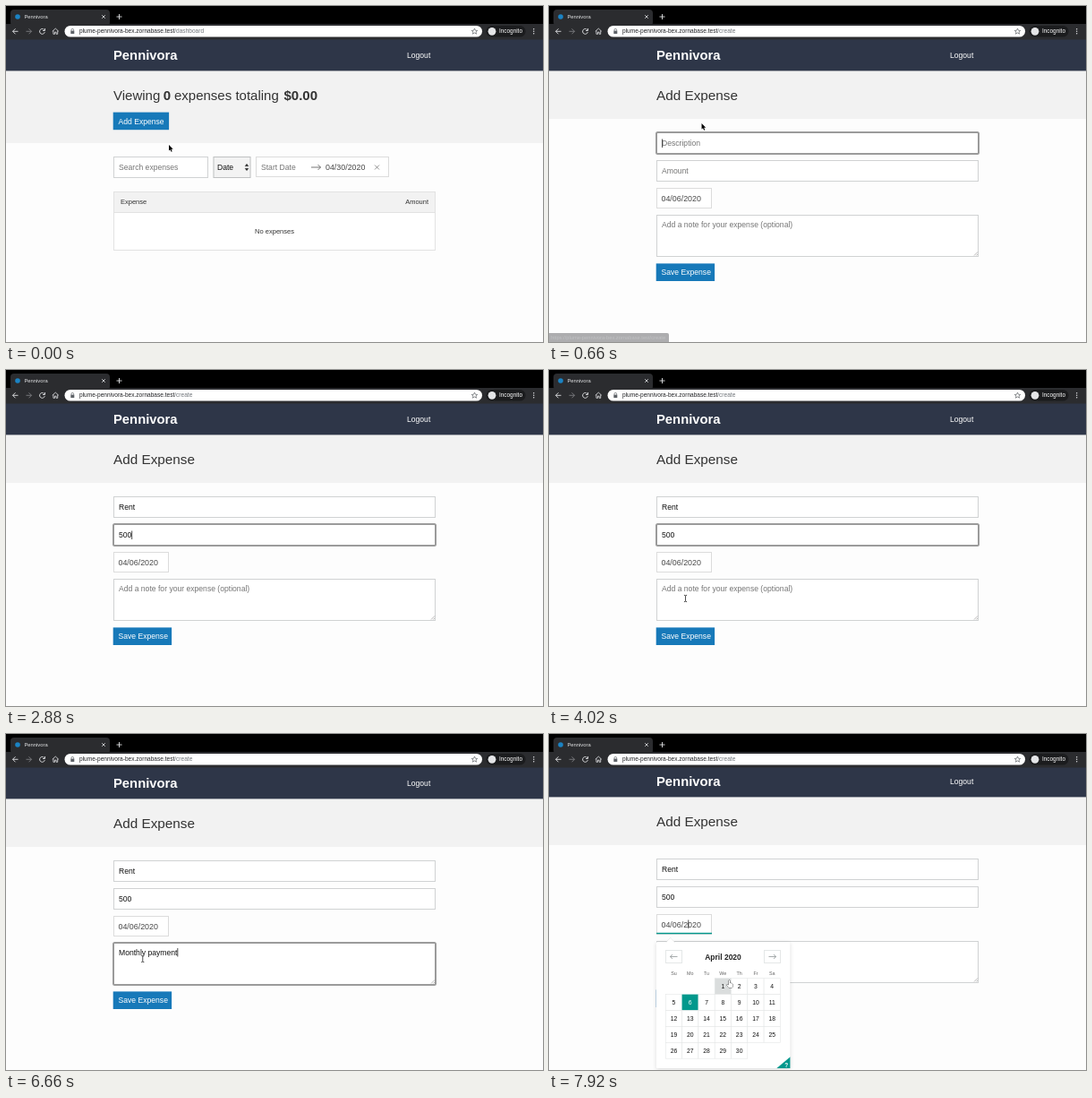
Write an HTML page with a canvas that moves like this. It is 600 px wide and 375 px high and loops after 8 s.

```html
<!DOCTYPE html>
<html lang="en">
<head>
<meta charset="utf-8">
<title>Pennivora</title>
<style>
html, body { margin: 0; width: 100%; height: 100%; overflow: hidden; background: #fdfdfd; }
canvas { display: block; width: 600px; height: 375px; }
</style>
</head>
<body>
<canvas id="stage"></canvas>
<script>
const canvas = document.getElementById('stage');
const c = canvas.getContext('2d');
const dpr = window.devicePixelRatio || 1;
canvas.width = 600 * dpr;
canvas.height = 375 * dpr;

const LOOP = 8000, STEP = 60;
const APP = 'Pennivora';
const HOST = 'plume-pennivora-bex.zornabase.test';
const INK = '#333', HINT = '#757575', LINE = '#d0d2d3', BLUE = '#1779b9', TEAL = '#02988c';

// Key times
const T = { hover: 300, open: 540, amount: 1980, note: 4080, date: 7020, scroll: 7500 };
const CURSOR = [
  [0, 182, 155], [60, 182, 155], [360, 171, 131], [720, 170.5, 131], [1020, 166, 152],
  [3360, 164, 158], [3780, 152.5, 255], [6600, 152.5, 255], [6900, 155, 216],
  [7500, 155, 216], [7860, 201.5, 275]
];

// Typed words: [first key time, delay per key, text]
const KEYS = {
  name: [[1200, 60, 'Rent']],
  amount: [[2220, 150, '500']],
  note: [[4560, 120, 'Monthly '], [5640, 120, 'payment']]
};

function typed(parts, t) {
  let text = '', last = 0;
  for (const [start, gap, word] of parts) {
    const n = Math.max(0, Math.min(word.length, Math.floor((t - start) / gap) + 1));
    text += word.slice(0, n);
    if (n) last = start + (n - 1) * gap;
  }
  return { text, last };
}

function cursorAt(t) {
  const i = CURSOR.findIndex(k => k[0] > t);
  if (i < 0) return CURSOR[CURSOR.length - 1].slice(1);
  const [t0, x0, y0] = CURSOR[i - 1], [t1, x1, y1] = CURSOR[i];
  const u = (t - t0) / (t1 - t0), e = u * u * (3 - 2 * u);
  return [x0 + (x1 - x0) * e, y0 + (y1 - y0) * e];
}

function text(s, x, y, size = 8.6, color = INK, align = 'left', weight = 400) {
  c.font = `${weight} ${size}px "Liberation Sans", Arial, sans-serif`;
  c.textAlign = align;
  c.fillStyle = color;
  c.fillText(s, x, y);
  return c.measureText(s).width;
}

function bold(s, x, y, size, color = INK, align = 'left') {
  text(s, x, y, size, color, align, 700);
}

function rect(x, y, w, h, color) {
  c.fillStyle = color;
  c.fillRect(x, y, w, h);
}

function box(x, y, w, h, fill = '#fff', line = LINE) {
  rect(x, y, w, h, fill);
  c.strokeStyle = line;
  c.lineWidth = 1;
  c.strokeRect(x + 0.5, y + 0.5, w - 1, h - 1);
}

function pill(x, y, w, h, r, color) {
  c.beginPath();
  c.roundRect(x, y, w, h, r);
  c.fillStyle = color;
  c.fill();
}

function disc(x, y, r, color) {
  c.beginPath();
  c.arc(x, y, r, 0, 7);
  c.fillStyle = color;
  c.fill();
}

function trace(d, x, y, line, width = 1, fill) {
  const p = new Path2D(d);
  c.save();
  c.translate(x, y);
  c.strokeStyle = line;
  c.lineWidth = width;
  c.lineJoin = 'round';
  c.stroke(p);
  if (fill) { c.fillStyle = fill; c.fill(p); }
  c.restore();
}

function button(label, y, w) {
  rect(119.7, y, w, 19.6, BLUE);
  text(label, 125.5, y + 12.9, 8.6, '#fff');
}

function caret(x, y) {
  rect(x, y, 0.8, 9.5, '#222');
}

function field(x, y, w, h, value, hint, focused, lastKey, t) {
  box(x, y, w, h);
  if (focused) {
    c.beginPath();
    c.roundRect(x, y, w, h, 1.5);
    c.strokeStyle = '#9b9b9b';
    c.lineWidth = 2;
    c.stroke();
  }
  const tall = h > 30;
  const end = text(value || hint, x + 6, y + (tall ? 13.8 : 15.2), 8.6, value ? '#111' : HINT);
  if (focused && Math.floor((t - lastKey) / 500) % 2 === 0)
    caret(x + 6 + (value ? end : 0), y + (tall ? 6 : 7.5));
}

function siteHeader(bottom) {
  rect(0, 72, 600, bottom - 72, '#f2f2f2');
  rect(0, 36, 600, 36.4, '#2e3648');
  bold(APP, 120, 60, 14.8, '#fff');
  text('Logout', 448, 58, 8.6, '#fff');
}

function dashboard() {
  siteHeader(153);
  text('Viewing', 120, 105, 15);
  bold('0', 175.7, 105, 15);
  text('expenses totaling', 188, 105, 15);
  bold('$0.00', 310.5, 105, 15);
  button('Add Expense', 118.6, 62.4);

  box(120, 168, 106, 24);
  text('Search expenses', 126, 183.3, 8.6, HINT);
  box(231.5, 168, 42, 24, '#f3f3f3', '#bfc1c2');
  text('Date', 236, 183.3, 8.6, '#111');
  trace('M-2-1.2L0-3.8L2-1.2ZM-2 1.2L0 3.8L2 1.2Z', 269, 180, '#222', 0.3, '#222');

  box(279, 168, 149, 23, '#fff', '#dcdcdc');
  text('Start Date', 285, 183, 8.6, HINT);
  trace('M0 0H10.5M7.5-3L10.5 0L7.5 3', 341, 180, '#555', 0.8);
  text('04/30/2020', 357, 183, 8.9, '#484848');
  trace('M-2.5-2.5L2.5 2.5M2.5-2.5L-2.5 2.5', 414.5, 180, '#777', 0.8);

  box(120, 207, 360, 66, '#fff', '#e2e2e2');
  box(120, 207, 360, 24, '#f2f2f2', '#e2e2e2');
  text('Expense', 128, 221.2, 7.5);
  text('Amount', 472, 221.2, 7.5, INK, 'right');
  text('No expenses', 300, 254, 7.5, INK, 'center');
}

function calendar(hovered) {
  const left = 130.3, top = 274.7, cw = 18.3, ch = 17.9;
  c.save();
  c.shadowColor = 'rgba(0,0,0,.15)';
  c.shadowBlur = 4 * dpr;
  c.shadowOffsetY = dpr;
  pill(119.8, 234, 149.6, 141, 1.5, '#fff');
  c.restore();
  trace('M0 5L4.7 0L9.4 5', 131, 229.5, '#d5d5d5', 0.7, '#fff');

  for (const [x, dir] of [[130, -1], [240, 1]]) {
    box(x, 243, 19, 15, '#fff', '#e4e7e7');
    const tip = 4 * dir, barb = 1.6 * dir;
    trace(`M${-tip} 0H${tip}M${barb}-2.5L${tip} 0L${barb} 2.5`, x + 9.5, 250.5, '#82888a', 0.7);
  }
  bold('April 2020', 194.5, 253.8, 8.5, '#222', 'center');
  'Su Mo Tu We Th Fr Sa'.split(' ').forEach((d, i) =>
    text(d, left + (i + 0.5) * cw, 271, 5.4, '#666', 'center'));

  for (let day = 1; day <= 30; day++) {
    const slot = day + 2;
    const x = left + (slot % 7) * cw, y = top + Math.floor(slot / 7) * ch;
    const chosen = day === 6;
    rect(x, y, cw, ch, chosen ? TEAL : day === hovered ? '#dadddd' : '#fff');
    if (!chosen) {
      c.strokeStyle = '#e4e7e7';
      c.lineWidth = 0.6;
      c.strokeRect(x, y, cw, ch);
    }
    text(day, x + cw / 2, y + 11.5, 6.8, chosen ? '#fff' : '#111', 'center');
  }
  trace('M269.4 362.5V375H254.5Z', 0, 0, TEAL, 0.1, TEAL);
  bold('?', 265.3, 373.5, 6.5, '#fff', 'center');
}

function createPage(t) {
  const name = typed(KEYS.name, t), amount = typed(KEYS.amount, t), note = typed(KEYS.note, t);
  const picking = t >= T.date;
  const focus = picking ? 'date' : t >= T.note ? 'note' : t >= T.amount ? 'amount' : 'name';

  siteHeader(126);
  text('Add Expense', 120, 105, 15.3);
  field(120, 141, 360, 24, name.text, 'Description', focus === 'name', name.last || T.open, t);
  field(120, 172, 360, 24, amount.text, 'Amount', focus === 'amount', amount.last || T.amount, t);

  box(120, 203, 62, 23, '#fff', '#dcdcdc');
  text('04/06/2020', 125.5, 217.6, 8.9, '#484848');
  if (picking) {
    rect(120, 223.8, 62, 1.4, TEAL);
    caret(155.4, 209.5);
  }

  const hint = 'Add a note for your expense (optional)';
  field(120, 233, 360, 47, note.text, hint, focus === 'note', note.last || T.note, t);
  trace('M0 4L4 0M2.4 4L4 2.4', 475, 274.5, '#888', 0.6);
  button('Save Expense', 287.4, 65.4);
  if (picking) calendar(t >= 7860 ? 1 : 0);
}

function chrome(t) {
  const bar = '#2b2c2f', icon = '#e4e5e7', mark = '#5f6368';
  rect(0, 0, 600, 20, '#000');
  rect(0, 20, 600, 17.5, bar);
  pill(5, 4, 111, 18, 4, bar);
  disc(13, 12, 2.8, '#1b83c4');
  text(APP, 20.5, 14, 5.8, icon);
  trace('M-1.8-1.8L1.8 1.8M1.8-1.8L-1.8 1.8', 109, 12, icon, 0.8);
  trace('M-3 0H3M0-3V3', 126.5, 12, icon, 0.9);

  trace('M3 0H-3M0-3L-3 0L0 3', 10.5, 28.3, icon, 0.9);
  trace('M-3 0H3M0-3L3 0L0 3', 25.5, 28.3, '#7d7e82', 0.9);
  trace('M2.2-1.8A2.9 2.9 0 1 0 2.8.8M3-3.3V-.8H.5', 40.5, 28.3, icon, 0.9);
  trace('M-3.5 0L0-3.2L3.5 0M-2.4-.8V3H-.8V.8H.8V3H2.4V-.8', 55.3, 28.3, icon, 0.8);

  pill(65.5, 22, 466.5, 12.6, 6.3, '#fff');
  trace('M-1.3-.5V-1.6A1.3 1.3 0 0 1 1.3-1.6V-.5', 74.3, 28.3, mark, 0.7);
  rect(72.3, 27.6, 4, 3.4, mark);
  const w = text(HOST, 82, 30.4, 6.55, '#202124');
  text(t < T.open ? '/dashboard' : '/create', 82 + w, 30.4, 6.55, '#70757a');
  trace('M0-3.4L1-1.1L3.3-1L1.5.5L2.1 2.8L0 1.5L-2.1 2.8L-1.5.5L-3.3-1L-1-1.1Z', 523.5, 28.4, mark, 0.7);

  pill(536.5, 22, 44, 12.6, 6.3, '#1b1c1e');
  disc(543, 28.3, 4.4, icon);
  text('Incognito', 551, 30.4, 6.4, '#fff');
  for (const y of [25.7, 28.2, 30.7]) disc(589.7, y, 0.7, icon);
}

function linkStatus(t) {
  if (t < T.hover || t >= 700) return;
  c.globalAlpha = Math.min(1, 1 - (t - 600) / 100);
  pill(-3, 365, 137, 14, 2, '#35363a');
  text(`https://${HOST}/create`, 2, 372.2, 5.75, '#dfe1e4');
  c.globalAlpha = 1;
}

function cursor(t) {
  const [x, y] = cursorAt(t);
  if ((t >= 1200 && t < 3360) || (t >= 4560 && t < 6600)) return;
  const hand = (t >= T.hover && t < T.open) || t >= 7800;
  const beam = !hand && t > T.open && y > 141 && !(t > T.scroll && y > 226);
  if (hand) {
    trace('M-.7 .2Q0-.5.7.2V3L3.2 3.5Q4.2 4 3.9 5.2L3.2 8H-.7L-2.8 5.4Q-2.9 4.2-1.8 4.7L-.7 5.5Z',
      x, y, '#333', 0.8, '#fff');
  } else if (beam) {
    const d = 'M-1.6-3.7Q0-3.7 0-2.8Q0-3.7 1.6-3.7M0-2.8V2.8M-1.6 3.7Q0 3.7 0 2.8Q0 3.7 1.6 3.7';
    trace(d, x, y, 'rgba(255,255,255,.8)', 1.8);
    trace(d, x, y, '#222', 0.8);
  } else {
    trace('M0 0V6.6L1.5 5.2L2.6 7.7L3.7 7.2L2.6 4.8H4.7Z', x, y, '#fff', 0.9, '#000');
  }
}

function draw(now) {
  const t = Math.min(7920, Math.floor((now % LOOP) / STEP) * STEP);
  const scroll = Math.max(0, Math.min(2, (t - T.scroll + STEP) / STEP));
  c.setTransform(dpr, 0, 0, dpr, 0, 0);
  rect(0, 0, 600, 375, '#fdfdfd');
  c.save();
  c.translate(0, -scroll);
  if (t < T.open) dashboard(); else createPage(t);
  c.restore();
  chrome(t);
  linkStatus(t);
  cursor(t);
  requestAnimationFrame(draw);
}
requestAnimationFrame(draw);
</script>
</body>
</html>
```
